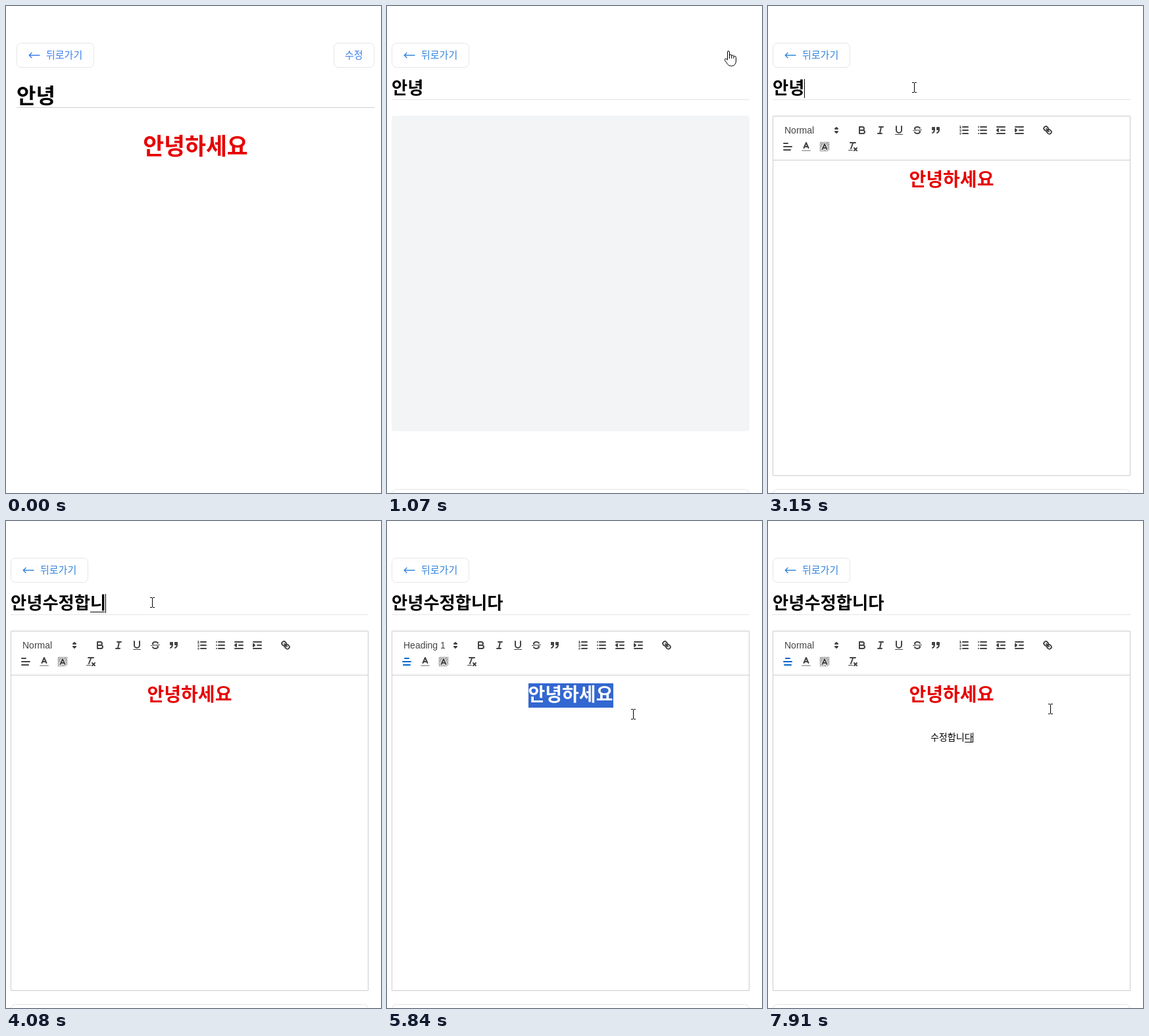
Animation, 570 px wide and 741 px high, one loop 8 s. Source, as an HTML page:

```html
<!DOCTYPE html>
<html lang="ko">
<head>
<meta charset="utf-8">
<style>
  html, body { margin: 0; width: 100%; height: 100%; overflow: hidden; background: #fff; }
  svg { display: block; }
  text { font-family: "Noto Sans CJK KR", "Noto Sans CJK", "Noto Sans KR", sans-serif; white-space: pre; }
  .bold { font-weight: 700; }
  .btn text { font-size: 15px; font-weight: 300; }
  .btn rect, .card { fill: #fff; stroke: #e5e5e5; }
  .arrow { fill: none; stroke-width: 1.4; stroke-linecap: round; stroke-linejoin: round; }
  .label { font: 14px "Liberation Sans", Arial, sans-serif; fill: #444; }
  .icon { fill: none; stroke: #444; stroke-width: 2; stroke-linecap: round; stroke-linejoin: round; }
  .icon .f { fill: #444; stroke: none; }
  .icon .fs { fill: #444; }
  .icon .thin { stroke-width: 1; }
  .icon.on { stroke: #06c; }
  .red { fill: #e60000; font-weight: 700; }
</style>
</head>
<body>
<svg id="stage" width="570" height="741" viewBox="0 0 570 741">
  <g id="view">
    <path d="M16 154.5H560" stroke="#cfcfd2"/>
    <text class="bold" x="16" y="148" font-size="32">안녕</text>
    <text class="red" x="288" y="226" font-size="34.7" text-anchor="middle">안녕하세요</text>
    <g class="btn">
      <rect x="498.5" y="56.5" width="61" height="37" rx="7"/>
      <text x="515" y="80.3" fill="#3b7ff0">수정</text>
    </g>
  </g>

  <g id="form">
    <path d="M7 142.5H551" stroke="#e5e5e5"/>
    <text id="title" class="bold" x="7" y="134" font-size="26.3"></text>
    <rect class="card" x="7.5" y="735.5" width="543" height="60" rx="7"/>
    <rect id="skeleton" x="7" y="167" width="544" height="480" rx="4" fill="#f3f4f6"/>
    <g id="editor">
      <path d="M7.5 167.5H550.5V714.5H7.5ZM7.5 234.5H550.5" fill="none" stroke="#ccc"/>
      <text id="format" class="label" x="25" y="194"></text>
      <g id="tools"></g>
      <rect id="sel" y="247" height="37" fill="#3367d1"/>
      <text class="red" x="279" y="274.4" font-size="28" text-anchor="middle"><tspan id="plain"></tspan><tspan id="picked" fill="#fff"></tspan></text>
      <text id="body" x="279.3" y="334.2" font-size="14.1" font-weight="300" text-anchor="middle"></text>
    </g>
    <rect id="caret" width="1"/>
    <rect id="under" height="1"/>
  </g>

  <g id="back" class="btn">
    <rect x="7.5" y="56.5" width="117" height="37" rx="7"/>
    <path class="arrow" d="M42 75H26.5M30 71.3L26.2 75L30 78.7"/>
    <text x="52" y="80.3">뒤로가기</text>
  </g>

  <circle id="press" r="12" fill="#ffff80"/>
  <g id="cursor">
    <path id="pointer" d="M.5.5V16.5L4.2 13L6.7 18.7L9 17.7L6.6 12.2H11.8Z" fill="#fff" stroke="#000"/>
    <path id="hand" d="M-1.5 14V2Q-1.5 .5 0 .5Q1.5 .5 1.5 2V8Q1.7 5.8 3.2 5.8Q4.7 5.8 4.8 7.3V8.5Q5 6.6 6.5 6.8Q8 7 8 8.5V9.5Q8.4 8 9.8 8.3Q11.5 8.7 11.5 10.5V16Q11.5 19 9.5 21Q9 23.3 4.5 23.3Q0 23.3 -1.3 20.5L-5 15.5Q-6.2 13.3 -5 12.3Q-3.4 11.5 -1.5 14ZM1.5 8V12M4.8 8.5V12M8 9.5V12" fill="#fff" stroke="#000"/>
    <path id="beam" d="M-3 -7.5H0M1 -7.5H4M-3 7.5H0M1 7.5H4M.5 -7V7" fill="none" stroke="#000"/>
  </g>
</svg>
<script>
const LOOP = 8000;
const $ = id => document.getElementById(id);
const show = (id, on) => $(id).setAttribute('display', on ? 'inline' : 'none');
const set = (id, attrs) => {
  for (const k in attrs) $(id).setAttribute(k, attrs[k]);
};

// Toolbar icons: 18 px boxes
const line = (a, b, c, d) => `<path d="M${a} ${b}L${c} ${d}"/>`;
const path = (d, cls = '') => `<path class="${cls}" d="${d}"/>`;
const rows = (x, end) => [4, 9, 14].map(y => line(x, y, end, y)).join('');
const hatch = () => {
  let d = '';
  for (let k = 6; k <= 30; k += 2.5) {
    const a = Math.max(2, k - 16), b = Math.min(16, k - 2);
    d += `M${a} ${k - a}L${b} ${k - b}`;
  }
  return path(d, 'thin');
};
const quote = x => `<rect class="fs" x="${x}" y="5" width="3" height="3"/>` +
  path(`M${x + 3} 8c0 4-3 5-3 5`, 'fs');
const bigA = dy => `M5.5 ${11 + dy}L9 ${3 + dy}L12.5 ${11 + dy}M11.6 ${9 + dy}H6.4`;
const dent = tip => line(3, 14, 15, 14) + line(3, 4, 15, 4) + line(9, 9, 15, 9) + path(tip, 'fs');
const alignLeft = line(3, 9, 15, 9) + line(3, 14, 13, 14) + line(3, 4, 9, 4);
const alignMid = line(3, 9, 15, 9) + line(4, 14, 14, 14) + line(6, 4, 12, 4);

const icons = [
  [95, 180, path('M7 11L9 13L11 11ZM7 7L9 5L11 7Z', 'fs')],
  [134, 180, path('M5 4H9.5A2.5 2.5 0 0 1 9.5 9H5ZM5 9H10.5A2.5 2.5 0 0 1 10.5 14H5Z')],
  [162, 180, line(7, 4, 13, 4) + line(5, 14, 11, 14) + line(8, 14, 10, 4)],
  [190, 180, path('M5 3V9a4 4 0 0 0 8 0V3') + '<rect class="f" x="3" y="15" width="12" height="1" rx=".5"/>'],
  [218, 180, path('M15.5 8.5L2.5 9.5', 'thin') +
    path('M9 8C6.5 7.8 6 7.5 6 6.5 6 5.8 7.3 5 9 5c1.6 0 2.8.7 3 1.3a1 1 0 0 0 1.9-.6C13.4 4.1 11.4 3 9 3 6.2 3 4 4.5 4 6.5a3.2 3.2 0 0 0 .5 1.8Z', 'f') +
    path('M9 10c2.5.2 3 .5 3 1.5 0 .7-1.3 1.5-3 1.5-1.6 0-2.8-.7-3-1.3a1 1 0 1 0-1.9.6C4.6 13.9 6.6 15 9 15c2.8 0 5-1.5 5-3.5a3.2 3.2 0 0 0-.5-1.8Z', 'f')],
  [246, 180, quote(4) + quote(11)],
  [289, 180, rows(7, 15) + path('M2.5 3L3.5 2.5V5.5M2.5 5.5H4.5M4.5 10.5h-2c0-.2 1.9-1.1 1.9-2.2A1 1 0 0 0 2.5 8.2M2.5 14.8a1 1 0 0 0 1.9-.1A.7.7 0 0 0 3.7 14a.7.7 0 0 0 .6-.7 1 1 0 0 0-1.8-.1', 'thin')],
  [317, 180, rows(6, 15) + rows(3, 3)],
  [345, 180, dent('M5 7V11L3 9Z')],
  [373, 180, dent('M3 7V11L5 9Z')],
  [416, 180, line(7, 7, 11, 11) +
    path('M8.9 4.6a3.5 3.5 0 0 1 .4 4.7A3.5 3.5 0 0 1 4.6 8.9C3.2 7.5 2 6.4 4.2 4.2S7.5 3.2 8.9 4.6Z') +
    path('M13.4 9.1a3.5 3.5 0 0 0-4.7-.4 3.5 3.5 0 0 0 .4 4.7c1.4 1.4 2.5 2.5 4.7.4S14.8 10.5 13.4 9.1Z')],
  [21, 205, alignLeft, 'align'],
  [49, 205, '<path d="M3 15H15" opacity=".4"/>' + path(bigA(0))],
  [77, 205, hatch() + `<path d="${bigA(2)}" stroke="#fff" stroke-width="4"/>` + path(bigA(2))],
  [120, 205, line(5, 3, 13, 3) + line(6, 12, 9.35, 3) + line(11, 11, 15, 15) + line(15, 11, 11, 15) +
    '<rect class="f" x="2" y="14" width="7" height="1" rx=".5"/>']
];
$('tools').innerHTML = icons.map(([x, y, art, id]) =>
  `<g class="icon"${id ? ` id="${id}"` : ''} transform="translate(${x} ${y})">${art}</g>`).join('');

// Step tables: [start, value]
const titleSteps = [
  [0, '안녕'], [3410, '안녕ㅅ'], [3480, '안녕수'], [3580, '안녕숮'], [3680, '안녕수정'],
  [3780, '안녕수정하'], [3880, '안녕수정합'], [4080, '안녕수정합니'], [4180, '안녕수정합닏'], [4280, '안녕수정합니다']
];
const bodySteps = [
  [0, ''], [6970, 'ㅅ'], [7050, '수'], [7130, '숮'], [7210, '수저'], [7280, '수정'], [7360, '수정ㅎ'],
  [7440, '수정하'], [7520, '수정합'], [7720, '수정합니'], [7820, '수정합닏'], [7910, '수정합니다']
];
const pickSteps = [[0, 0], [5340, 1], [5400, 2], [5435, 3], [5470, 4], [5500, 5], [5960, 0]];
const caretSteps = [
  [0, ''], [2150, 'title'], [2680, ''], [3150, 'title'], [4810, ''],
  [5960, 'head'], [6510, 285], [6640, 303], [6770, 322]
];
const pressSteps = [[0, 0], [870, 1], [1000, 0], [2090, 1], [2220, 0], [5090, 1], [5500, 0], [5900, 1], [5990, 0]];
const track = [
  [190, 414, 703], [320, 424, 610], [500, 458, 390], [680, 500, 160], [800, 517, 80], [870, 519, 68],
  [1590, 519, 68], [1680, 465, 84], [1800, 318, 116], [1950, 222, 128], [2080, 222, 124],
  [4780, 222, 124], [4880, 305, 205], [4980, 430, 315], [5070, 487, 357], [5120, 487, 357],
  [5220, 425, 298], [5370, 287, 293], [5500, 216, 290],
  [5680, 216, 290], [5780, 310, 291], [5880, 415, 296], [5970, 420, 296], [6050, 429, 286]
];

const at = (steps, t) => steps.reduce((v, s) => (t >= s[0] ? s[1] : v), steps[0][1]);

function place(t) {
  const i = track.findIndex(p => p[0] > t);
  if (i < 0) return track[track.length - 1].slice(1);
  if (!i) return track[0].slice(1);
  const [a, b] = [track[i - 1], track[i]];
  const k = (t - a[0]) / (b[0] - a[0]);
  return [a[1] + (b[1] - a[1]) * k, a[2] + (b[2] - a[2]) * k];
}

function drawCursor(t) {
  const [x, y] = place(t);
  let kind = 'pointer';
  if (t < 1590) { if (x > 498 && y < 94) kind = 'hand'; }
  else if (y > 235 || (y > 108 && y < 142)) kind = 'beam';
  for (const id of ['pointer', 'hand', 'beam']) show(id, id === kind);
  show('cursor', t >= 190);
  set('cursor', { transform: `translate(${Math.round(x)} ${Math.round(y)})` });
  const [cx, cy] = place(t + 3);
  set('press', { cx, cy });
  show('press', at(pressSteps, t));
}

function drawCaret(t, title, body) {
  const spot = at(caretSteps, t);
  const n = title.length;
  show('caret', spot !== '');
  if (spot === 'title') set('caret', { x: Math.floor(6.9 + 24.1 * n), y: 111, height: 29, fill: '#000' });
  else if (spot === 'head') set('caret', { x: 343, y: 247, height: 37, fill: '#e60000' });
  else if (spot) set('caret', { x: Math.floor(279 + 6.5 * body.length), y: spot, height: 15, fill: '#000' });

  const inTitle = t >= 3410 && t < 5090;
  show('under', inTitle || body);
  if (inTitle) set('under', { x: Math.round(7.5 + 24.1 * (n - 1)), y: 138, width: 22 });
  else if (body) set('under', { x: Math.round(266.5 + 6.5 * body.length), y: 336, width: 12 });
}

function draw(t) {
  const form = t >= 1000, ready = t >= 1400;
  show('view', !form);
  show('form', form);
  show('skeleton', !ready);
  show('editor', ready);
  set('back', {
    transform: `translate(${form ? 0 : 9} 0)`,
    fill: form ? '#3385dd' : '#3b7ff0',
    stroke: 'none'
  });
  $('back').querySelector('.arrow').style.stroke = form ? '#3385dd' : '#3b7ff0';

  const title = at(titleSteps, t), body = at(bodySteps, t);
  $('title').textContent = title;
  $('body').textContent = body;
  $('format').textContent = t >= 5700 && t < 6510 ? 'Heading 1' : 'Normal';

  const centred = t >= 5700;
  if ($('align').classList.contains('on') !== centred) {
    $('align').classList.toggle('on', centred);
    $('align').innerHTML = centred ? alignMid : alignLeft;
  }

  const n = at(pickSteps, t), head = '안녕하세요';
  $('plain').textContent = head.slice(0, 5 - n);
  $('picked').textContent = head.slice(5 - n);
  set('sel', { x: Math.round(343.8 - 25.8 * n), width: Math.round(25.8 * n) });

  drawCaret(t, title, body);
  drawCursor(t);
}

function tick() {
  draw(performance.now() % LOOP);
  requestAnimationFrame(tick);
}
tick();
</script>
</body>
</html>
```
